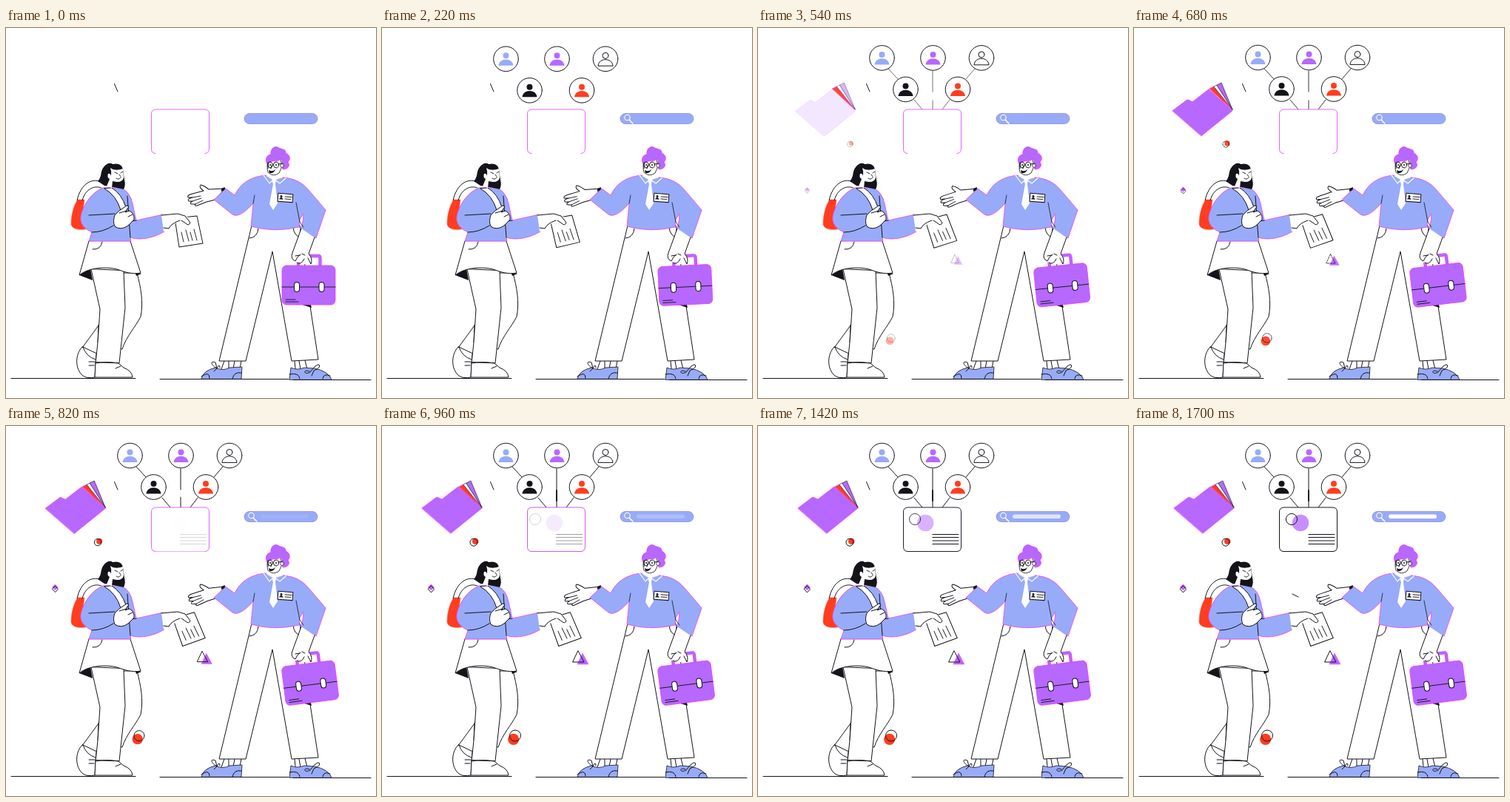
These frames come from a looping animation (500x500 px, 1720 ms). An HTML page with a canvas:

```html
<!DOCTYPE html>
<html lang="en">
<head>
<meta charset="utf-8">
<title>Job interview</title>
<style>
html, body { margin: 0; width: 100%; height: 100%; overflow: hidden; background: #fff; }
canvas { display: block; width: 500px; height: 500px; }
</style>
</head>
<body>
<canvas id="stage" width="500" height="500"></canvas>
<script>
const g = document.getElementById('stage').getContext('2d');
const LOOP = 1720;
const BLUE = '#98abf8', PURPLE = '#b668ff', RED = '#ff3d1f', INK = '#14131a', WHITE = '#fff', EDGE = '#f03cf4';

const clamp = v => Math.max(0, Math.min(1, v));
const span = (t, a, b) => clamp((t - a) / (b - a));
const mix = (a, b, k) => a + (b - a) * k;

function paint(path, fill, line, width = 1) {
  if (fill) { g.fillStyle = fill; g.fill(path); }
  if (line) { g.strokeStyle = line; g.lineWidth = width; g.stroke(path); }
}
const shape = (d, fill, line, width) => paint(new Path2D(d), fill, line, width);
const ink = (d, width = 1) => shape(d, null, INK, width);

function disc(x, y, r, fill, line, width) {
  const p = new Path2D();
  p.arc(x, y, r, 0, 7);
  paint(p, fill, line, width);
}
function oval(x, y, rx, ry, fill, line, width) {
  const p = new Path2D();
  p.ellipse(x, y, rx, ry, 0, 0, 7);
  paint(p, fill, line, width);
}
function box(x, y, w, h, r, fill, line, width) {
  const p = new Path2D();
  p.roundRect(x, y, w, h, r);
  paint(p, fill, line, width);
}
function group(alpha, dx, dy, draw) {
  if (alpha <= 0) return;
  g.save();
  g.globalAlpha = alpha;
  g.translate(dx, dy);
  draw();
  g.restore();
}
function turned(deg, x, y, draw) {
  g.save();
  g.translate(x, y);
  g.rotate(deg * Math.PI / 180);
  g.translate(-x, -y);
  draw();
  g.restore();
}

function ground() {
  ink('M7 473.5H175M208 474.5H382M388 475.5H493');
}

function woman(swing) {
  // legs and shoes
  shape('M103 431C93 441 93 461 104 470Q110 474 120 472L122 440Z', WHITE, INK);
  ink('M104 431Q108 444 121 448M112 451H120M112 456H119');
  shape('M160 331L177 331C182 350 186 370 182 390C175 404 163 416 157 434L124 425L125 402Z', WHITE, INK);
  shape('M115 326L127 380L124 425L121 453H153L161 378L159 328Z', WHITE, INK);
  ink('M125 402L103 432');
  shape('M121 452L120 472H171Q170 463 159 459L152 453Z', WHITE, INK);
  ink('M121 453Q136 450 152 453M148 460L155 457');
  shape('M99 334L114 325L117 341Z', INK);
  shape('M174 329L183 332L176 335Z', INK);

  // backpack
  shape('M97 232H106L104 246C102 258 105 266 111 271C100 274 89 272 88 265C88 254 91 240 97 232Z', RED, '#ff5a40', .6);
  ink('M96 233C101 210 117 201 131 209M103 233C107 218 119 212 129 216');

  // top
  shape('M112 288L99 334C110 324 135 322 150 326C161 330 170 333 182 331L168 288Z', WHITE, INK);
  ink('M117 299Q128 300 130 289');
  shape('M131 216C115 222 104 240 101 254C99 265 107 272 116 276L112 288H169L168 283C182 288 201 283 214 275L212 252L176 260L171 237Q168 222 156 216Z', BLUE, EDGE, .8);
  ink('M112 253L147 251M116 276Q131 276 145 267M164 227L168 283M169 261L176 260');
  shape('M133 217Q149 226 155 246L162 242Q156 224 143 216Z', WHITE, INK);

  // near hand
  shape('M147 253Q144 261 147 268Q155 274 165 267L173 259Q174 251 167 247L161 249L166 241L163 240L153 247Z', WHITE, INK);
  ink('M153 250L163 247M165 255L171 252');

  // head
  shape('M132 188C136 182 142 182 144 184C152 182 157 185 158 191L160 205Q162 213 159 218L150 216L133 213L124 207C130 201 127 194 132 188Z', INK);
  shape('M141 189C146 193 153 192 158 190L159 202Q158 208 150 208L144 207L143 216L136 214L140 204Q136 202 138 197Q141 196 142 200Q143 194 141 189Z', WHITE);
  ink('M147 195L151 197M155 196L158 194M153 198L155 201M149 203Q152 206 155 202', .9);

  // paper and far hand
  turned(-11 * swing, 244, 272, () => {
    shape('M228 257L258 254L266 291L234 296Z', WHITE, INK);
    ink('M237 276L240 289M243 273L247 288M249 276L252 287M254 272L258 287', .9);
  });
  shape('M210 253L232 251L247 256L249 263L245 268L237 260L230 262L225 271L213 275Z', WHITE);
  ink('M210 253L232 251L242 254L249 263Q247 268 243 264L237 260M235 260Q223 264 220 271L213 270');
}

function shoe(d) { shape(d, BLUE, INK, .8); }

function manLegs() {
  shape('M290 449L289 462H320L322 449ZM389 449L387 462H412L410 448Z', WHITE);
  ink('M295 450L291 461M301 450V461M309 450L307 461M318 450L316 460M390 450L391 460M396 450L398 461M404 449L407 461');
  shoe('M264 474Q266 463 283 459Q293 464 302 459L319 458L318 474Z');
  ink('M275 473Q275 463 264 471M306 474Q308 464 318 466M285 460C276 455 276 449 283 452Q284 456 285 460Q289 452 289 459M285 460L281 464');
  shoe('M383 475L385 459Q394 463 403 459L417 460Q436 464 440 475Z');
  ink('M383 468Q396 465 397 474M428 474Q429 466 438 470M410 464C401 460 402 470 411 465Q419 454 423 455Q426 459 416 463L413 470');
  shape('M332 267L288 450H324L360 302L386 450L422 448L411 376L397 267Z', WHITE, INK);
  ink('M341 271Q340 283 329 284M388 269Q389 282 399 283');
  shape('M394 372L413 378L411 370Z', INK);
}

function manBody(swing) {
  turned(-3.5 * swing, 295, 218, () => {
    shape('M296 217L274 218Q268 213 263 212Q260 215 267 220L252 224Q244 226 246 229L252 229Q244 231 247 234L252 234Q247 237 251 238L256 238Q254 241 258 240L271 235L283 232Z', WHITE, INK);
    ink('M252 229L263 227M252 234L264 230M256 238L266 233', .9);
  });
  shape('M349 199C327 202 316 212 309 226L297 217L281 232L306 252Q315 258 334 237L331 268Q362 277 396 269L397 259L402 251Q401 270 397 271L419 284L432 246L409 219Q397 204 376 202Z', BLUE, EDGE, .8);
  shape('M291 217L296 215L295 219L291 221Z', INK);
  ink('M334 237L336 226M397 262L392 236M397 262L402 269', .8);
  shape('M354 193L352 200L362 206L374 202L371 191Z', WHITE);
  shape('M348 199L356 210L362 204L370 210L378 203', null, WHITE, 1.2);
  shape('M359 206L365 206L364 211L367 237L361 246L356 238L361 211Z', WHITE);

  // badge
  turned(4, 378, 229, () => {
    box(367.5, 224, 20, 11, 0, WHITE, INK);
    disc(372, 228, 1.5, INK);
    shape('M369 232Q372 227 375 232Z', INK);
    ink('M377 228H386M377 231H385', .9);
  });

  // head
  shape('M354 178Q352 188 354 195Q361 202 369 196L373 187L370 174Z', WHITE, INK, .8);
  shape('M353 184C349 177 353 171 358 171C357 164 362 159 367 161C371 164 379 163 378 169C385 172 384 179 381 181C385 187 380 191 374 191L372 184Q375 178 370 178C364 182 360 177 353 184Z', PURPLE, EDGE, .8);
  oval(357, 185, 3, 4, null, INK, 1);
  oval(365, 185, 3.5, 4, null, INK, 1);
  ink('M368 184L374 183M354 182V190M359 186L358 190');
  shape('M355 192Q360 195 364 191Q362 197 356 196Z', INK);
  disc(373, 186, 2.4, WHITE, INK, .7);
  disc(357, 185, 1, INK);
  disc(365, 185, 1, INK);
}

function forearm() {
  shape('M399 271L417 283L409 305Q415 313 412 319L408 311L407 318Q402 321 399 316Q392 320 390 315Q384 311 390 303L390 300Z', WHITE);
  ink('M399 271L387 304Q384 312 391 315Q393 309 398 306M417 283L409 305Q415 312 412 319L408 311M393 317Q399 321 403 312M400 305L404 307M391 308L397 307');
}

function briefcase(swing) {
  turned(-7.3 * swing, 408, 331, () => {
    const handle = 'M395 322V311Q395 308 398 308H422Q424.5 308 424.5 311V322';
    shape(handle, null, EDGE, 4.4);
    shape(handle, null, PURPLE, 3);
    box(373, 321, 72, 53, 6, PURPLE, EDGE, .8);
    ink('M373 350H445M378 367H391M378 370H395', .9);
    box(389.5, 343.5, 7, 13, 3.5, WHITE, INK);
    box(423, 343.5, 7, 13, 3.5, WHITE, INK);
  });
}

function avatar(x, y, color) {
  disc(x, y, 16.8, WHITE, INK);
  const line = color === WHITE ? INK : null;
  shape(`M${x - 10} ${y + 9}C${x - 9} ${y - 2} ${x + 9} ${y - 2} ${x + 10} ${y + 9}Z`, color, line, 1);
  disc(x, y - 4.5, 4, color, line, 1);
}

function network(t) {
  group(span(t, 220, 760), 0, 0, () => {
    ink('M176 55L189 69M293 55L281 69M211 97L222 110M259 97L249 110');
    const gap = 6 * (1 - span(t, 680, 900)) + 6;
    if (t < 940) ink(`M236 58V${mix(66, 86, span(t, 220, 450))}M236 ${92 + gap / 2}V110`);
    else { ink('M236 58V110'); ink('M236 87V101', 1.8); }
  });
  const rise = 2.5 * (1 - span(t, 60, 640));
  group(span(t, 20, 180), 0, rise, () => {
    avatar(167.5, 40, BLUE);
    avatar(236.5, 40, PURPLE);
    avatar(302, 40, WHITE);
    avatar(199.5, 82.5, INK);
    avatar(270, 82.5, RED);
  });
}

function card(t) {
  const k = span(t, 900, 1480);
  const line = `rgb(${mix(226, 20, k)},${mix(100, 19, k)},${mix(255, 26, k)})`;
  shape('M202 169.5Q196.5 169.5 196.5 163V116Q196.5 110 203 110H268Q274.5 110 274.5 116V163Q274.5 169.5 269 169.5', WHITE, line);
  group(span(t, 700, 920), 0, 0, () => shape('M202 169.5H269', null, line));

  const u = span(t, 600, 1720), e = 1 - (1 - u) * (1 - u);
  group(span(t, 800, 2000), 0, 0, () => disc(225 + 17 * (1 - e), 131, 11.2, PURPLE));
  group(span(t, 820, 1600), 0, 0, () => disc(200 + 13 * e, 126, 7.6, null, INK));
  group(span(t, 720, 1320), e, 0, () => ink('M235 146.5H270M235 150.5H270M235 155H270M235 159.5H270'));
}

function search(t) {
  box(322, 115.5, 99, 14, 7, BLUE, '#8178dd', .6);
  group(span(t, 40, 220), 0, 0, () => {
    disc(331.5, 121, 3.8, null, WHITE, 1.1);
    shape('M334 124L339 129', null, WHITE, 1.5);
  });
  group(span(t, 760, 1700), 0, 0, () => box(344, 119.5, 65, 5.5, 2.7, WHITE));
}

function folder(t) {
  const dx = -7 * (1 - span(t, 300, 960)) ** 1.5;
  group(span(t, 300, 560), dx, 0, () => {
    shape('M104 82L110 79L134 110Z', RED, EDGE, .8);
  });
  group(span(t, 440, 640), dx, 0, () => {
    shape('M110 79L114 77L135 110Z', WHITE, INK, .6);
    shape('M114 77L120 74L135 110Z', PURPLE, INK, .6);
  });
  group(span(t, 520, 650), dx, -dx * .4, () => {
    shape('M54 111L74 96L81 99L103 82L135 111L93 145Z', PURPLE, EDGE, .8);
  });
}

function confetti(t) {
  const a = span(t, 440, 700), s = mix(.65, 1, span(t, 440, 900));
  const piece = (x, y, draw) => group(a, x, y, () => { g.scale(s, s); draw(); });
  const ring = () => g.setLineDash(t < 820 ? [3, 1.5] : []);
  piece(125, 156.5, () => {
    disc(1.2, -.7, 4.3, RED);
    ring();
    disc(-1, .7, 5, null, INK);
  });
  piece(66.5, 219, () => {
    shape('M0 -5L4 -1L0 3L-4 -1Z', PURPLE, EDGE, .5);
    ring();
    ink('M0 -3L4 1.5L0 6L-4 1.5Z');
  });
  piece(268, 313, () => {
    shape('M3 -6L11 9H-4Z', PURPLE, EDGE, .5);
    ring();
    ink('M-3 -9L5 6H-10Z');
  });
  piece(179, 421, () => {
    disc(-1.3, 2.3, 7.6, RED);
    ring();
    disc(1, -2.5, 7.5, null, INK);
  });
}

function frame(t) {
  g.clearRect(0, 0, 500, 500);
  g.lineJoin = g.lineCap = 'round';
  const swing = Math.sin(span(t, 0, 900) * Math.PI / 2);
  ground();
  woman(swing);
  manLegs();
  manBody(swing);
  briefcase(swing);
  forearm();
  network(t);
  card(t);
  search(t);
  folder(t);
  confetti(t);
  ink('M146.5 75.5L151 86');
  group(span(t, 1420, 1620), 0, 0, () => ink('M214 227L222 231'));
}

const start = performance.now();
function tick() {
  frame((performance.now() - start) % LOOP);
  requestAnimationFrame(tick);
}
tick();
</script>
</body>
</html>
```
